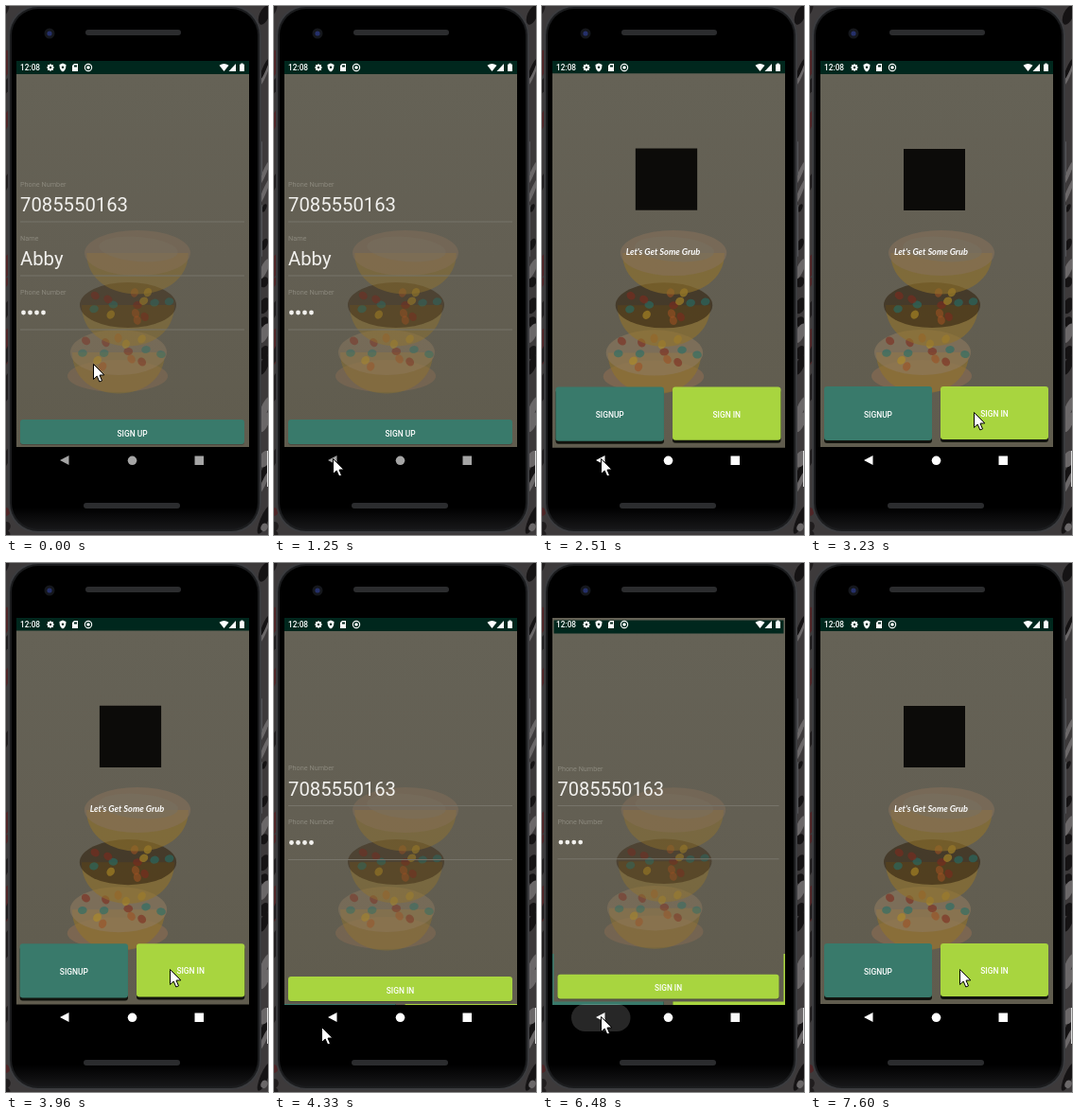
An HTML page with a canvas for the animation above (8000 ms loop, 277 by 559 pixels).

```html
<!DOCTYPE html>
<html lang="en">
<head>
<meta charset="utf-8">
<style>
html, body { margin: 0; width: 100%; height: 100%; overflow: hidden; background: #000; }
canvas { display: block; }
</style>
</head>
<body>
<canvas id="stage" width="277" height="559"></canvas>
<script>
const ctx = document.getElementById('stage').getContext('2d');
const LOOP = 8000, STEP = 140, PHASE = 120;
const FADE = 400;
const BACK_1 = 2240, OPEN = 3865, BACK_2 = 6390;
const TEAL = '#397a6b', LIME = '#a8d53f', DARK = '#00271d', WHITE = '#fff';

const clamp = v => Math.max(0, Math.min(1, v));
const ramp = (t, from, to) => clamp((t - from) / (to - from));
const mix = (a, b, u) => a + (b - a) * u;

const held = t => Math.max(0, Math.floor((t - PHASE) / STEP) * STEP + PHASE);

function random(seed) {
  return () => (seed = seed * 16807 % 2147483647) / 2147483647;
}

function pointerAt(t) {
  let x = 92, y = 378;
  const glide = (from, to, toX, toY) => {
    const u = ramp(t, from, to);
    x = mix(x, toX, u);
    y = mix(y, toY, u);
  };
  glide(540, 960, 62, 478);
  glide(2500, 3200, 173, 429);
  glide(3900, 4320, 50, 490);
  glide(4320, 4600, 62, 479);
  glide(6900, 7540, 158, 429);
  return [x, y];
}

function rect(x, y, w, h, color, r = 0) {
  ctx.fillStyle = color;
  ctx.beginPath();
  ctx.roundRect(x, y, w, h, r);
  ctx.fill();
}

function oval(x, y, rx, ry, color, angle = 0) {
  ctx.fillStyle = color;
  ctx.beginPath();
  ctx.ellipse(x, y, rx, ry, angle, 0, Math.PI * 2);
  ctx.fill();
}

const dot = (x, y, r, color) => oval(x, y, r, r, color);

function shape(path, color, outline) {
  const p = new Path2D(path);
  ctx.fillStyle = color;
  ctx.fill(p);
  if (outline) {
    ctx.strokeStyle = outline;
    ctx.stroke(p);
  }
}

function text(s, x, y, size, color, weight = 400, align = 'left') {
  ctx.font = `${weight} ${size}px Roboto, sans-serif`;
  ctx.fillStyle = color;
  ctx.textAlign = align;
  ctx.fillText(s, x, y);
}

function vertical(y0, y1, ...colors) {
  const g = ctx.createLinearGradient(0, y0, 0, y1);
  colors.forEach((c, i) => g.addColorStop(i / (colors.length - 1), c));
  return g;
}

function surroundings() {
  rect(0, 0, 277, 559, '#3d3a3b');
  const rnd = random(77), tones = ['#201d1e', '#6b6869', '#4f2527', '#151314'];
  for (let i = 0; i < 50; i++) {
    const x = i % 2 ? 273 : 0;
    oval(x, rnd() * 559, 2 + rnd() * 4, 4 + rnd() * 12, tones[i % tones.length], 0.4);
  }
  rect(276, 470, 1, 38, '#ddd');
}

function phone() {
  rect(267, 143, 4, 36, '#57585b', 1);
  rect(267, 210, 4, 55, '#57585b', 1);
  rect(2, -1, 268, 558, '#3b3c3f', 32);
  rect(4, 1, 264, 554, '#1b1c1e', 30);
  rect(6, 3, 260, 550, vertical(530, 553, '#000', '#171719'), 28);
  rect(84, 25, 101, 6, '#2b2c2e', 3);
  rect(82, 525, 102, 6, '#2b2c2e', 3);
  dot(46, 29, 5.5, '#15171c');
  dot(46, 29, 2.6, '#25306a');
}

function sprinkles(cx, cy, rx, ry, seed) {
  const colors = ['#7d2a1e', '#256e68', '#b08c24', '#9b5023'];
  const rnd = random(seed);
  for (let i = 0; i < 14; i++) {
    const a = i * 2.4 + rnd(), r = Math.sqrt((i + 0.7) / 14);
    oval(cx + Math.cos(a) * rx * r, cy + Math.sin(a) * ry * r, 4.8, 4, colors[i % 4], a);
  }
}

function cake(cx, top, rx, icing) {
  const w = rx * 0.96;
  shape(`M${cx - w} ${top} C${cx - w} ${top + 58} ${cx + w} ${top + 58} ${cx + w} ${top}Z`, '#93742a');
  oval(cx, top, rx, 24, icing);
}

function cakes(strength) {
  ctx.save();
  ctx.globalAlpha *= strength;
  oval(118, 391, 53, 17, '#8d6d52');
  cake(119, 366, 51, '#8e7b60');
  sprinkles(119, 365, 46, 19, 11);
  cake(129, 316, 51, '#33230f');
  sprinkles(129, 316, 45, 18, 29);
  cake(139, 261, 56, '#86705a');
  oval(140, 257, 42, 13, '#79705f', 0.08);
  ctx.restore();
}

function backdrop(strength) {
  rect(11, 58, 246, 408, vertical(72, 466, '#656256', '#635f53', '#605c4e'));
  rect(11, 58, 246, 14, DARK);
  cakes(strength);
}

function button(x, y, w, h, color, label) {
  rect(x, y + 3, w, h, '#11130d', 3);
  rect(x, y, w, h, color, 3);
  text(label, x + w / 2, y + h / 2 + 4, 8.4, WHITE, 500, 'center');
}

function home() {
  backdrop(0.6);
  rect(99, 151, 65, 65, '#0c0b09');
  ctx.font = 'italic 700 9.2px Lato, cursive';
  ctx.fillStyle = WHITE;
  ctx.textAlign = 'center';
  ctx.fillText("Let's Get Some Grub", 128, 262.5);
  button(15, 402, 114, 57, TEAL, 'SIGNUP');
  button(138, 402, 114, 56, LIME, 'SIGN IN');
}

function field(y, label, value) {
  text(label, 15, y, 7.3, '#8b887d');
  if (value) text(value, 15, y + 26.5, 20.3, '#f1f0ed');
  else for (let i = 0; i < 4; i++) dot(18.5 + i * 7, y + 19.5, 2.4, '#f1f0ed');
  rect(15, y + 37, 237, 1, '#77746a');
}

function form(isSignUp) {
  backdrop(0.45);
  const fields = [['Phone Number', '7085550163'], ['Phone Number']];
  if (isSignUp) fields.splice(1, 0, ['Name', 'Abby']);
  const top = 276 - 28.5 * fields.length;
  fields.forEach((f, i) => field(top + i * 57, ...f));
  rect(15, 438, 237, 26, '#4b493f', 3);
  rect(15, 437, 237, 26, isSignUp ? TEAL : LIME, 3);
  text(isSignUp ? 'SIGN UP' : 'SIGN IN', 133.5, 454.5, 8.4, WHITE, 500, 'center');
}

function layer(scale, alpha, draw) {
  ctx.save();
  ctx.globalAlpha = alpha;
  ctx.translate(134, 262);
  ctx.scale(scale, scale);
  ctx.translate(-134, -262);
  draw();
  ctx.restore();
}

function closing(u, isSignUp) {
  const rest = (1 - u) ** 3;
  layer(1 + 0.1 * rest, 1, home);
  layer(0.94 + 0.06 * rest, 1 - ramp(u, 0.1, 0.5), () => form(isSignUp));
}

function opening(u) {
  layer(1 + 0.1 * u ** 1.5, 1, home);
  layer(1 - 0.1 * (1 - u) ** 3, ramp(u, 0.15, 0.5), () => form(false));
}

function statusBar() {
  text('12:08', 15, 68, 8.3, WHITE, 500);
  for (let i = 0; i < 4; i++) oval(47, 65, 4, 1.1, WHITE, i * Math.PI / 4);
  dot(47, 65, 2.8, WHITE);
  dot(47, 65, 1.2, DARK);
  shape('M60 60.5 l3.5 1.5 q0 6 -3.5 7.5 q-3.5 -1.5 -3.5 -7.5z', WHITE);
  dot(60, 64.7, 1.2, DARK);
  shape('M72 61 h4 v8 h-6 v-6z', WHITE);
  rect(72, 62.5, 3, 2, DARK);
  dot(87, 65, 4.2, WHITE);
  dot(87, 65, 3.1, DARK);
  dot(87, 65, 1.8, WHITE);
  shape('M225.5 62.8 q5 -3.6 10 0 l-5 6.2z', WHITE);
  shape('M243 61 v8 h-7.5z', WHITE);
  rect(247, 61.5, 5, 7.5, WHITE, 0.5);
  rect(248.5, 60.5, 2, 2, WHITE);
}

function navBar(t) {
  const press = back => ramp(t, back - 280, back - 60) * (1 - ramp(t, back, back + 200));
  const ripple = 0.18 * Math.max(press(BACK_1), press(BACK_2));
  rect(31, 466, 62.5, 29, `rgba(255,255,255,${ripple})`, 14.5);

  // Icons dim while idle and light up again on touch.
  const glow = ramp(t, 1740, 2400) - ramp(t, 4640, 5490) + ramp(t, 6140, 6440);
  const level = Math.round(mix(165, 255, glow));
  const color = `rgb(${level},${level},${level})`;
  shape('M57 480 l9.5 -5 v10z', color);
  dot(133.5, 480.3, 4.8, color);
  rect(199.5, 475.5, 9.5, 9.5, color);
}

function pointer(t) {
  const [x, y] = pointerAt(t);
  ctx.save();
  ctx.translate(Math.round(x) + 0.5, Math.round(y) + 0.5);
  shape('M0 0 V16 L3.7 12.6 L6.3 18.5 L9 17.4 L6.5 11.6 L11.3 11.4Z', WHITE, '#000');
  ctx.restore();
}

function render(t) {
  surroundings();
  phone();
  ctx.save();
  ctx.beginPath();
  ctx.rect(11, 58, 246, 409);
  ctx.clip();
  if (t < BACK_1) form(true);
  else if (t < OPEN) closing(ramp(t, BACK_1, BACK_1 + FADE), true);
  else if (t < BACK_2) opening(ramp(t, OPEN, OPEN + FADE));
  else closing(ramp(t, BACK_2, BACK_2 + FADE), false);
  statusBar();
  ctx.restore();
  navBar(t);
  pointer(t);
}

const start = performance.now();
function frame() {
  render(held((performance.now() - start) % LOOP));
  requestAnimationFrame(frame);
}
frame();
</script>
</body>
</html>
```
